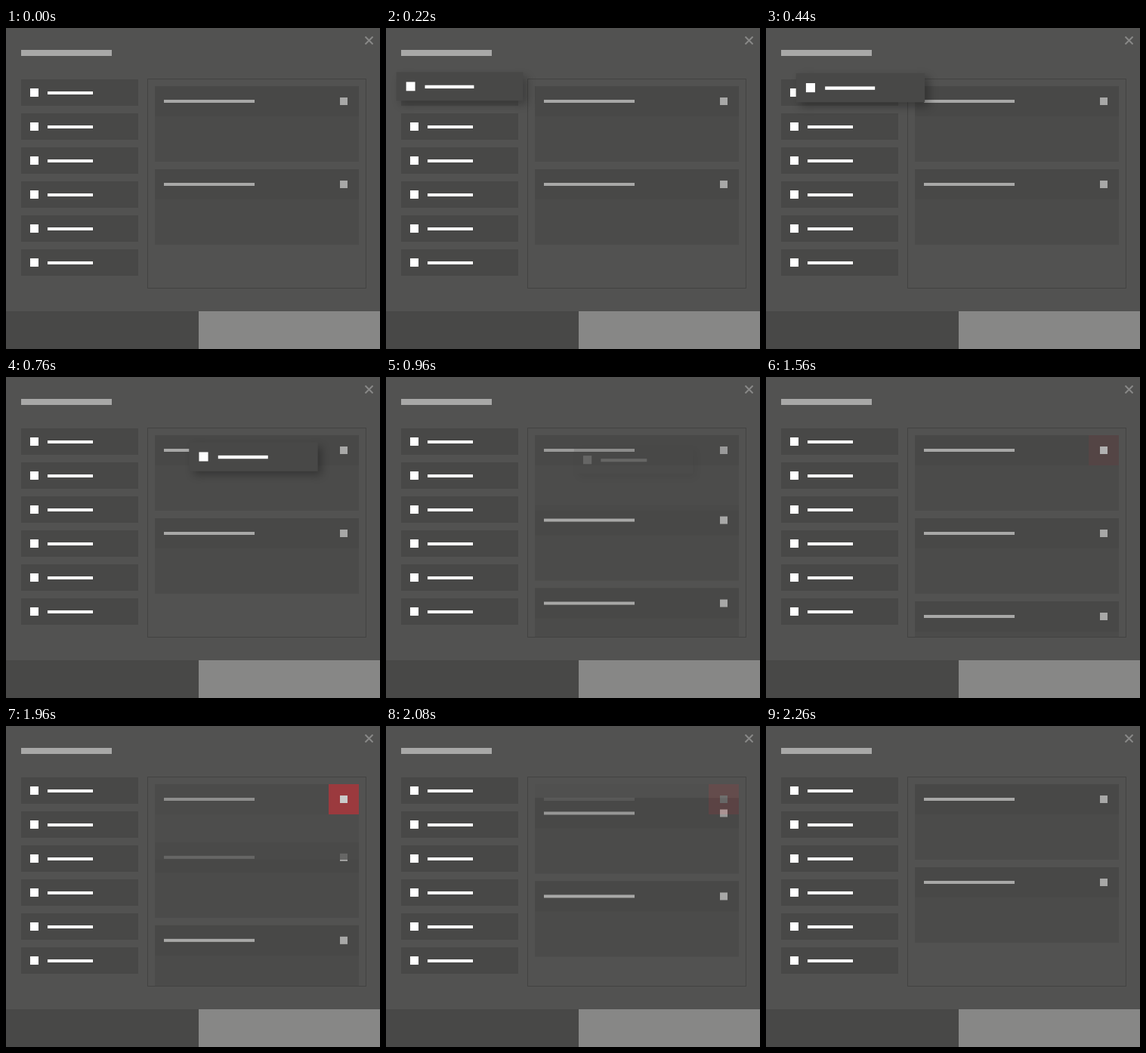
An HTML page that plays this animation: 495 px wide and 425 px high, repeating every 2400 ms.

```html
<!DOCTYPE html>
<html lang="en">
<head>
<meta charset="utf-8">
<title>Drag, drop and remove</title>
<style>
html, body { margin: 0; width: 100%; height: 100%; overflow: hidden; background: #525251; }
div, svg { position: absolute; box-sizing: border-box; }
#stage { width: 495px; height: 425px; overflow: hidden; background: #525251; }
.title { left: 20px; top: 29px; width: 120px; height: 8px; background: #a8a8a7; }
.close { left: 475px; top: 11px; stroke: #888887; stroke-width: 2; }
.card { left: 20px; width: 155px; height: 35px; background: #484847; }
.card::before, .card::after, .head::before, .head::after { content: ""; position: absolute; }
.card::before { left: 12px; top: 12px; width: 11px; height: 11px; background: #fff; }
.card::after { left: 35px; top: 16px; width: 60px; height: 4px; background: #fff; }
#list { left: 187px; top: 67px; width: 290px; height: 278px; border: 1px solid #434342; overflow: hidden; }
.item { left: 9px; top: 9px; width: 270px; height: 100px; background: #4b4b4a; }
.head { width: 270px; height: 40px; background: #484847; }
.head::before { left: 12px; top: 18px; width: 120px; height: 4px; background: #a8a8a7; }
.button { right: 0; width: 40px; height: 40px; }
.icon { left: 15px; top: 15px; width: 10px; height: 10px; background: #a8a8a7; }
.foot { top: 375px; height: 50px; }
</style>
</head>
<body>
<div id="stage">
  <div class="title"></div>
  <svg class="close" width="11" height="11"><path d="M.5 .5l10 10m0-10l-10 10"/></svg>
  <div id="list"></div>
  <div class="foot" style="left:0;width:255px;background:#484847"></div>
  <div class="foot" style="left:255px;width:240px;background:#878786"></div>
</div>
<script>
const LOOP = 2400, STEP = 365;
const LIFT = 34, MOVE = 399, DROP = 763, HOVER = 1522, REMOVE = 1887;
const stage = document.getElementById('stage');
const list = document.getElementById('list');

function add(parent, className, html = '') {
  const el = document.createElement('div');
  el.className = className;
  el.innerHTML = html;
  parent.append(el);
  return el;
}

function addCard(top) {
  const card = add(stage, 'card');
  card.style.top = top + 'px';
  return card;
}

const addItem = () => add(list, 'item',
  '<div class="head"><div class="button"><div class="icon"></div></div></div>');

for (let i = 0; i < 6; i++) addCard(68 + 45 * i);
const dragged = addCard(68);
const olds = [addItem(), addItem()];
const fresh = addItem();
const button = fresh.querySelector('.button');
const icon = fresh.querySelector('.icon');

// cubic-bezier(.25, .1, .25, 1)
function ease(x) {
  if (x <= 0) return 0;
  if (x >= 1) return 1;
  const curve = (a, b, u) => 3 * a * u * (1 - u) ** 2 + 3 * b * u * u * (1 - u) + u ** 3;
  let lo = 0, hi = 1;
  for (let i = 0; i < 24; i++) {
    const mid = (lo + hi) / 2;
    if (curve(.25, .25, mid) < x) lo = mid; else hi = mid;
  }
  return curve(.1, 1, lo);
}

function draw(now) {
  const t = now % LOOP;
  const phase = start => ease((t - start) / STEP);
  const lift = phase(LIFT), move = phase(MOVE), drop = phase(DROP), hover = phase(HOVER);
  const shown = drop - phase(REMOVE);

  const x = 230 * move, y = -10 * lift + 30 * move + 5 * drop;
  dragged.style.transform = `translate(${x}px, ${y}px) scale(${1 + .1 * (lift - drop)})`;
  dragged.style.boxShadow = `5px 5px 10px rgba(0, 0, 0, ${.3 * lift})`;
  dragged.style.opacity = 1 - drop;

  fresh.style.opacity = shown;
  olds.forEach((item, i) => item.style.transform = `translateY(${110 * (i + shown)}px)`);
  button.style.background = `rgba(187, 48, 54, ${hover})`;
  const grey = 168 + 87 * hover;
  icon.style.background = `rgb(${grey}, ${grey}, ${grey})`;
}

const begin = performance.now();
function tick() {
  draw(performance.now() - begin);
  requestAnimationFrame(tick);
}
tick();
</script>
</body>
</html>
```
